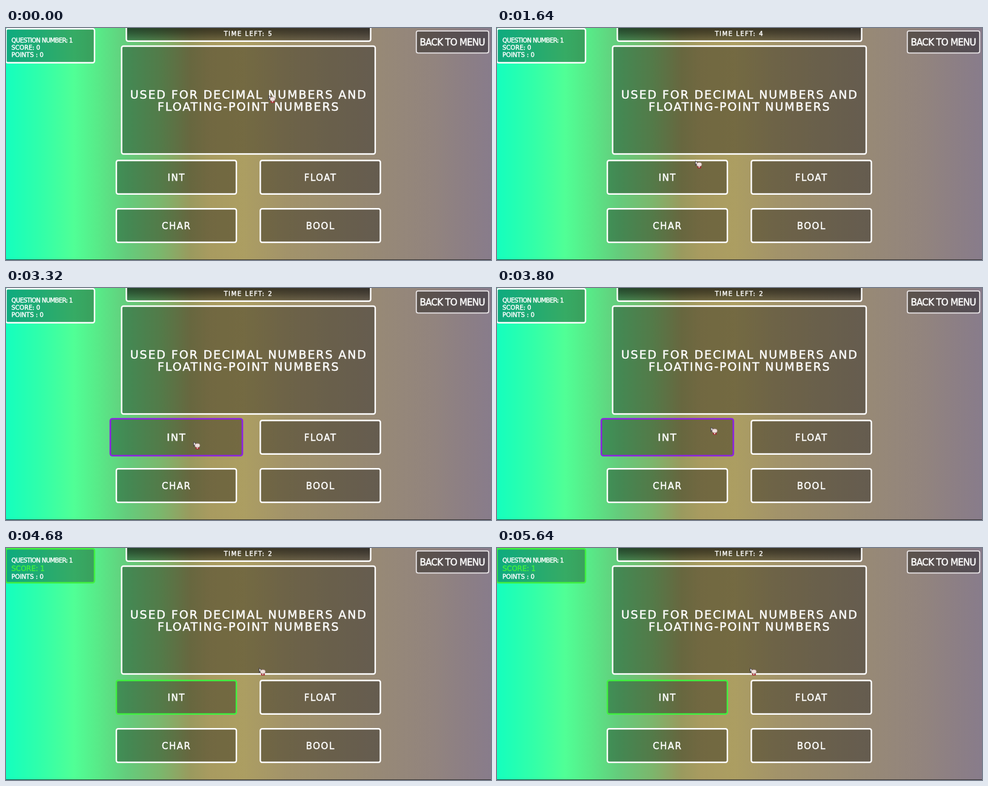
These frames come from a looping animation (800 by 384 pixels, 5680 ms). An HTML page:

```html
<!DOCTYPE html>
<html lang="en">
<head>
<meta charset="utf-8">
<title>Quiz</title>
<style>
html, body { margin: 0; width: 100%; height: 100%; overflow: hidden; background: #333; }
svg { display: block; width: 100%; height: 100%; }
text { font-family: "DejaVu Sans", sans-serif; fill: #fff; stroke: #fff; stroke-width: .45px; }
.panel { fill: #000; fill-opacity: .33; stroke: #fff; stroke-width: 2.4px; }
</style>
</head>
<body>
<svg id="stage" viewBox="0 0 800 384">
  <defs>
    <linearGradient id="sky">
      <stop offset="0" stop-color="#14ffbe"/>
      <stop offset=".07" stop-color="#30ffaa"/>
      <stop offset=".14" stop-color="#50ff96"/>
      <stop offset=".19" stop-color="#58ea88"/>
      <stop offset=".25" stop-color="#64cc7c"/>
      <stop offset=".32" stop-color="#7cb66c"/>
      <stop offset=".38" stop-color="#9a9a5e"/>
      <stop offset=".42" stop-color="#a89b60"/>
      <stop offset=".49" stop-color="#ac9e62"/>
      <stop offset=".58" stop-color="#a2936a"/>
      <stop offset=".75" stop-color="#988a75"/>
      <stop offset=".88" stop-color="#92847e"/>
      <stop offset=".96" stop-color="#8b7e86"/>
      <stop offset="1" stop-color="#887c8b"/>
    </linearGradient>
    <linearGradient id="shade" x2="0" y2="1">
      <stop offset="0" stop-opacity=".75"/>
      <stop offset=".55" stop-opacity=".55"/>
      <stop offset="1" stop-opacity=".33"/>
    </linearGradient>
  </defs>
  <rect width="800" height="384" fill="url(#sky)"/>
  <rect y="383" width="800" height="1" fill="#222" opacity=".8"/>
</svg>
<script>
const LOOP = 5680;
const REVEAL = 4520;
const PURPLE = [140, 34, 226];
const GREEN = "#40f040";
const stage = document.getElementById("stage");

function add(tag, attrs, parent = stage) {
  const el = document.createElementNS("http://www.w3.org/2000/svg", tag);
  for (const key in attrs) el.setAttribute(key, attrs[key]);
  parent.append(el);
  return el;
}

// Box given by the centre lines of its border.
const panel = (x, y, width, height, parent) =>
  add("rect", { class: "panel", x, y, width, height, rx: 3 }, parent);

function label(str, x, y, size, spacing, anchor = "middle", parent = stage) {
  const shift = anchor === "middle" ? spacing / 2 : 0;
  const el = add("text", {
    x: x + shift, y, "font-size": size, "letter-spacing": spacing, "text-anchor": anchor
  }, parent);
  el.textContent = str;
  return el;
}

function answer(str, x, y) {
  const group = add("g", {});
  const box = panel(x - 99, y - 27.5, 198, 55.5, group);
  label(str, x - .5, y + 5.8, 15, 1.5, "middle", group);
  return { group, box, x, y };
}

const scoreBox = panel(0, 1.2, 146, 56.3);
label("QUESTION NUMBER: 1", 9, 23.5, 10, -.6, "start");
const score = label("", 9, 35.5, 10, 0, "start");
const points = label("POINTS : 0", 9, 47.5, 10, 0, "start");

panel(198.5, -8, 403, 29.7).style.cssText = "fill:url(#shade);fill-opacity:1";
const timer = label("", 399, 12.7, 10, 1.5);

panel(676.8, 4.8, 119.4, 36.5).style.cssText = "fill-opacity:.38;stroke:#e8e4e6;stroke-width:1.8px";
label("BACK TO MENU", 736.5, 28.5, 15, -.7);

panel(190.7, 30, 418.3, 178.5);
label("USED FOR DECIMAL NUMBERS AND", 399.3, 117, 19, 1.9);
label("FLOATING-POINT NUMBERS", 399.3, 136.5, 19, 1.9);

answer("FLOAT", 518.5, 246.7);
answer("CHAR", 281, 326.7);
answer("BOOL", 518.5, 326.7);
const picked = answer("INT", 281, 246.7);

const cursor = add("g", {});
add("path", { d: "M0 0L0 9L3 7L7 5Z", fill: "#4c4648" }, cursor);
add("path", { d: "M1 1.5V6L4 4.5Z", fill: "#eee" }, cursor);
add("path", { d: "M3.5 9H9.5L10 13H4Z", fill: "#a32a30" }, cursor);
add("ellipse", { cx: 6.7, cy: 6.6, rx: 4.3, ry: 3.4, fill: "#eee0dc", stroke: "#8d6f6c", "stroke-width": .7 }, cursor);
add("circle", { cx: 6.6, cy: 11, r: 1.1, fill: "#f2e6e4" }, cursor);

// Each key: time, then values.
const PATH = [
  [0, 433, 111], [1200, 433, 111], [1440, 384, 161], [1640, 327, 219],
  [1840, 307, 257], [1960, 307, 257], [2400, 309, 254], [3640, 309, 254],
  [3800, 352, 230], [3960, 417, 198]
];
const HOVER = [[1660, 0], [1820, .65], [1960, .92], [2040, 1], [3800, 1], [3920, .4], [4080, 0]];
const TINT = [[1660, 0], [1820, .7], [2000, 1]];

function sample(keys, t) {
  if (t <= keys[0][0]) return keys[0].slice(1);
  const next = keys.findIndex(key => key[0] > t);
  if (next < 0) return keys[keys.length - 1].slice(1);
  const a = keys[next - 1], b = keys[next];
  const k = (t - a[0]) / (b[0] - a[0]);
  return a.slice(1).map((v, i) => v + (b[i + 1] - v) * k);
}

function draw(t) {
  const solved = t >= REVEAL;
  timer.textContent = "TIME LEFT: " + (t < 840 ? 5 : t < 1880 ? 4 : t < 3040 ? 3 : 2);

  score.textContent = "SCORE: " + (solved ? 1 : 0);
  score.style.fill = score.style.stroke = solved ? GREEN : "#fff";
  score.setAttribute("font-size", solved ? 11.6 : 10);
  score.setAttribute("y", solved ? 38.3 : 35.5);
  points.setAttribute("y", solved ? 51.3 : 47.5);
  scoreBox.style.stroke = solved ? GREEN : "#fff";

  const [tint] = sample(TINT, t);
  const rgb = PURPLE.map(c => Math.round(255 + (c - 255) * tint));
  picked.box.style.stroke = solved ? GREEN : `rgb(${rgb})`;
  const scale = 1 + .1 * sample(HOVER, t)[0];
  picked.group.setAttribute("transform",
    `translate(${picked.x} ${picked.y}) scale(${scale}) translate(${-picked.x} ${-picked.y})`);

  cursor.setAttribute("transform", `translate(${sample(PATH, t)})`);
}

const start = performance.now();
function tick() {
  draw((performance.now() - start) % LOOP);
  requestAnimationFrame(tick);
}
tick();
</script>
</body>
</html>
```
